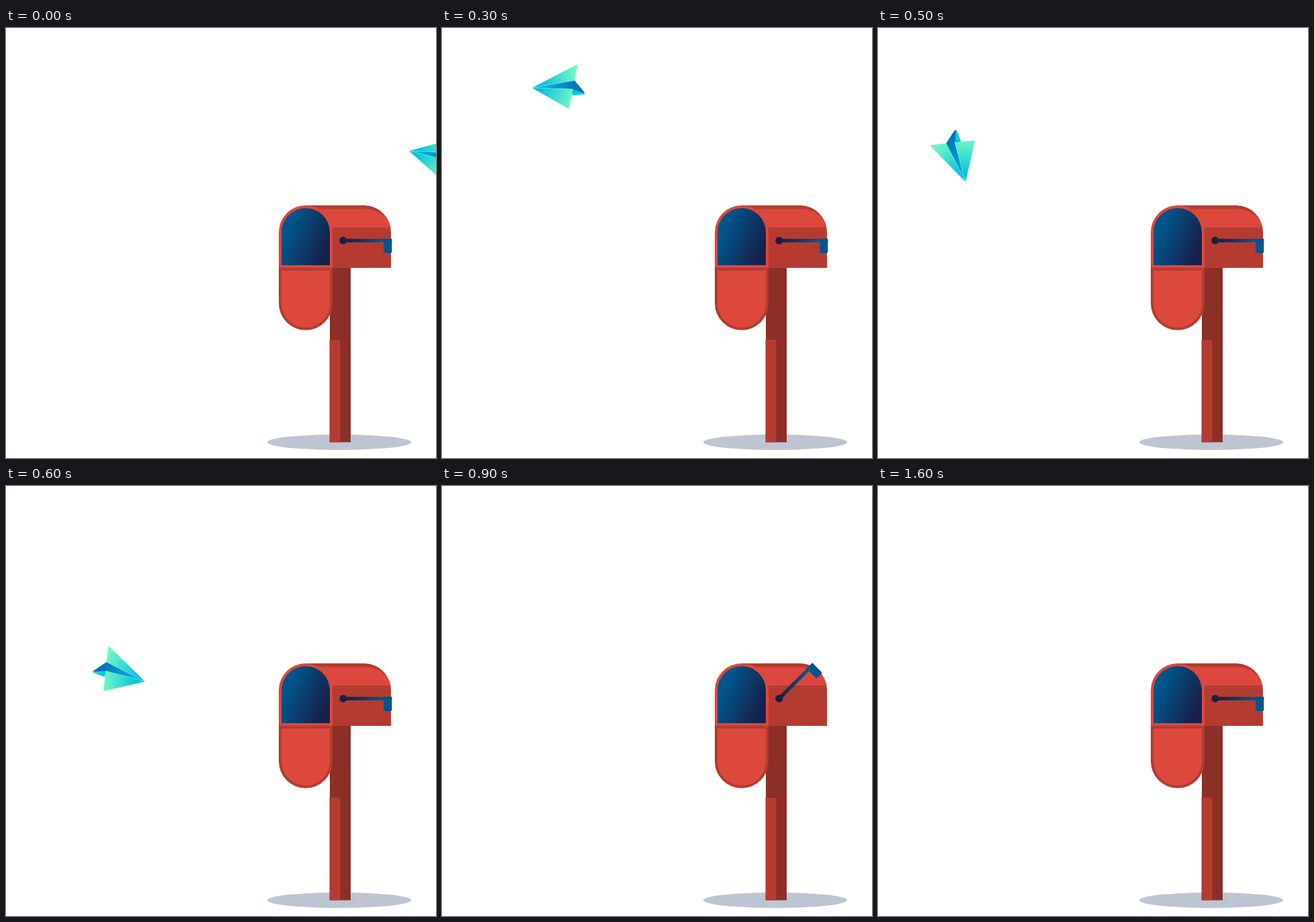
Write an HTML page with a canvas that moves like this. It is 640 px wide and 640 px high and loops after 1.8 s.

```html
<!DOCTYPE html>
<html lang="en">
<head>
<meta charset="utf-8">
<title>Mailbox</title>
<style>
html, body { margin: 0; width: 100%; height: 100%; overflow: hidden; background: #fff; }
canvas { display: block; width: 100vw; height: 100vh; }
</style>
</head>
<body>
<canvas id="stage" width="640" height="640"></canvas>
<script>
const ctx = document.getElementById('stage').getContext('2d');
const LOOP = 1800, STEP = 100;
const RED = '#dd483c', BRICK = '#b53b31', MAROON = '#8b2f27';
const NAVY = '#17204a', BLUE = '#00568c', CYAN = '#00c0dd', MINT = '#70f7c6';

// Plane nose x, y, rotation in degrees, horizontal direction; one pose per step
const FLIGHT = [
  [600, 183, 12, 1], [428, 127, 16, 1], [273, 84, 18, 1], [134, 89, 0, 1],
  [97, 155, -50, 1], [130.3, 229, -107, 1], [207, 291, -17, -1], [406.5, 306, -1.5, -1]
];

function gradient(x0, y0, x1, y1, from, to) {
  const g = ctx.createLinearGradient(x0, y0, x1, y1);
  g.addColorStop(0, from);
  g.addColorStop(1, to);
  return g;
}

function rect(x, y, w, h, fill, radii = 0) {
  ctx.beginPath();
  ctx.roundRect(x, y, w, h, radii);
  ctx.fillStyle = fill;
  ctx.fill();
}

function ellipse(x, y, rx, ry, fill) {
  ctx.beginPath();
  ctx.ellipse(x, y, rx, ry, 0, 0, Math.PI * 2);
  ctx.fillStyle = fill;
  ctx.fill();
}

// Face starting at the nose, with rounded corner (x, y)
function face(fill, x, y, r, endX, endY) {
  ctx.beginPath();
  ctx.moveTo(0, 0);
  ctx.arcTo(x, y, endX, endY, r);
  ctx.lineTo(endX, endY);
  ctx.closePath();
  ctx.fillStyle = fill;
  ctx.fill();
}

function crease(x, y) {
  ctx.beginPath();
  ctx.moveTo(0, 0);
  ctx.lineTo(x, y);
  ctx.strokeStyle = 'rgba(150, 245, 235, .6)';
  ctx.lineWidth = 0.7;
  ctx.stroke();
}

function drawMailbox() {
  ellipse(496, 616.5, 107, 11.5, '#bcc5d1');
  rect(482, 350, 31, 266.5, MAROON);
  rect(481.5, 464, 16, 152.5, BRICK);

  rect(446, 264, 127, 93, BRICK, [0, 40, 0, 0]);
  ctx.beginPath();
  ctx.moveTo(446, 269.5);
  ctx.lineTo(533, 269.5);
  ctx.bezierCurveTo(553, 269.5, 569, 280, 572.4, 297);
  ctx.lineTo(446, 297);
  ctx.fillStyle = RED;
  ctx.fill();

  rect(406, 355, 80, 94.8, BRICK, [0, 0, 40, 40]);
  rect(410, 361, 72, 84.8, RED, [0, 0, 36, 36]);
  rect(406, 264, 80, 92.7, RED, [40, 40, 0, 0]);
  rect(410, 268, 72, 85, gradient(420, 298, 480, 322, BLUE, NAVY), [36, 36, 0, 0]);
}

function drawFlag(angle) {
  ctx.save();
  ctx.translate(501.8, 316.4);
  ctx.rotate(angle);
  const fill = gradient(4, 0, 58, 0, NAVY, BLUE);
  rect(0, -2.6, 72.5, 5.2, fill);
  rect(60.2, -2.6, 12.3, 21.2, BLUE, [0, 1, 2, 2]);
  ellipse(0, 0, 5.6, 5.6, NAVY);
  ctx.restore();
}

function drawPlane([x, y, degrees, dir]) {
  ctx.save();
  ctx.translate(x, y);
  ctx.scale(dir, 1);
  ctx.rotate(degrees * Math.PI / 180);

  ctx.beginPath();
  ctx.moveTo(60, 1);
  ctx.lineTo(79, 10);
  ctx.lineTo(59.5, 11);
  ctx.fillStyle = gradient(60, 8, 78, 10, CYAN, '#22d9d4');
  ctx.fill();

  ctx.beginPath();
  ctx.moveTo(0, 0);
  ctx.lineTo(63.3, -11);
  ctx.arcTo(81, 10.5, 60.8, 2, 1.2);
  ctx.lineTo(60.8, 2);
  ctx.fillStyle = gradient(18, 4, 70, -6, '#00b2e0', '#0071b6');
  ctx.fill();

  face(gradient(12, 0, 66, -18, CYAN, MINT), 68, -35.3, 1.6, 63.3, -11);
  face(gradient(10, 0, 60, 17, CYAN, MINT), 55, 31.6, 1.6, 60.8, 2);
  crease(63.3, -11);
  crease(60.8, 2);
  ctx.restore();
}

function flagAngle(t) {
  if (t < 700 || t >= 1600) return 0;
  const p = Math.min((t - 700) / 400, 1);
  return -Math.PI / 2 * p * p * (3 - 2 * p);
}

function render(now) {
  const t = Math.floor((now % LOOP) / STEP) * STEP;
  ctx.fillStyle = '#fff';
  ctx.fillRect(0, 0, 640, 640);
  drawMailbox();
  drawFlag(flagAngle(t));
  const pose = FLIGHT[t / STEP];
  if (pose) drawPlane(pose);
}

const start = performance.now();
function tick() {
  render(performance.now() - start);
  requestAnimationFrame(tick);
}
tick();
</script>
</body>
</html>
```
